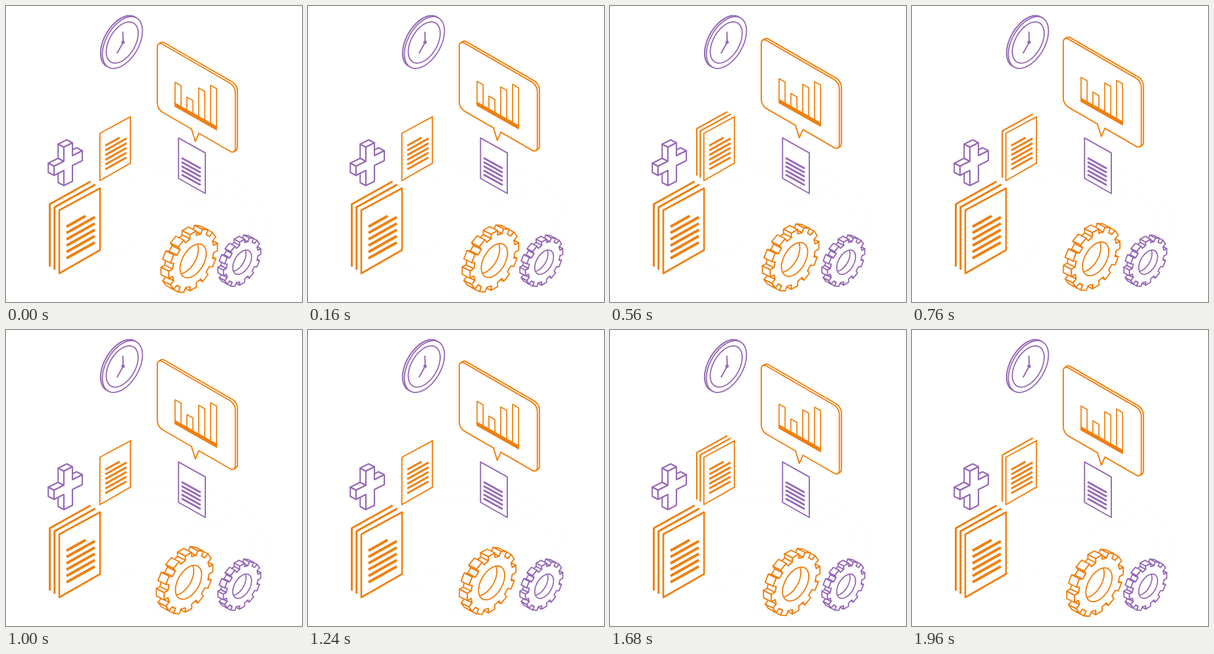
An HTML page with a canvas that plays this animation: 450 by 450 pixels, repeating every 2000 ms.

```html
<!DOCTYPE html>
<html lang="en">
<head>
<meta charset="utf-8">
<title>Isometric report icons</title>
<style>
html, body { margin: 0; width: 100%; height: 100%; overflow: hidden; background: #fff; }
canvas { display: block; width: 450px; height: 450px; }
</style>
</head>
<body>
<canvas id="stage" width="450" height="450"></canvas>
<script>
const ctx = document.getElementById('stage').getContext('2d');
const ORANGE = '#ef7f0f', PURPLE = '#9568b6', WHITE = '#fff', PALE = '#fcfcfc';
const COS = 0.866, SLOPE = 0.577;

function paint(color, width, fill) {
  if (fill) { ctx.fillStyle = fill; ctx.fill(); }
  ctx.strokeStyle = color;
  ctx.lineWidth = width;
  ctx.stroke();
}

function trace(points, closed) {
  ctx.beginPath();
  points.forEach(p => ctx.lineTo(p[0], p[1]));
  if (closed) ctx.closePath();
}

function line(color, width, ...points) {
  trace(points);
  paint(color, width);
}

function shape(points, color, width, fill = WHITE) {
  trace(points, true);
  paint(color, width, fill);
}

// Point at angle a on a circle standing in the plane that rises to the right
const iso = (x, y, r, a) =>
  [x + COS * r * Math.cos(a), y + r * (Math.sin(a) - Math.cos(a) / 2)];

function disc(x, y, r) {
  trace(Array.from({ length: 90 }, (_, i) => iso(x, y, r, i * Math.PI / 45)), true);
}

// Solid with a clockwise front outline and its depth along (dx, dy)
function extrude(points, dx, dy, color, width) {
  const sides = points.map((p, i) => [p, points[(i + 1) % points.length]])
    .filter(([p, q]) => (q[1] - p[1]) * dx - (q[0] - p[0]) * dy > 0);
  const depth = ([p, q]) => (p[0] + q[0]) * dx + (p[1] + q[1]) * dy;
  sides.sort((a, b) => depth(a) - depth(b));
  for (const [p, q] of sides) {
    shape([p, q, [q[0] + dx, q[1] + dy], [p[0] + dx, p[1] + dy]], color, width);
  }
  shape(points, color, width);
}

function gear(x, y, outer, inner, hole, dx, dy, color, width) {
  const teeth = 12, step = 2 * Math.PI / teeth, rim = [];
  for (let i = 0; i < teeth; i++) {
    for (const [r, k] of [[inner, -0.29], [outer, -0.25], [outer, 0.25], [inner, 0.29]]) {
      rim.push(iso(x, y, r, (i + k) * step));
    }
  }
  extrude(rim, dx, dy, color, width);
  ctx.save();
  disc(x, y, hole);
  ctx.clip();
  disc(x + dx, y + dy, hole);
  paint(color, width);
  ctx.restore();
  disc(x, y, hole);
  paint(color, width);
}

// Barely visible curved arrows behind everything
function arrows() {
  for (const inset of [0, 21]) {
    ctx.beginPath();
    ctx.ellipse(236, 335, 160 - inset, 99 - inset, 0, -2, 1.7);
    paint(PALE, 1);
  }
  shape([[269, 306], [296, 287], [330, 289]], PALE, 1);
  shape([[137, 393], [198, 361], [168, 396]], PALE, 1);
}

function clock() {
  disc(174.3, 54, 35.2);
  paint(PURPLE, 2, WHITE);
  disc(177, 55.5, 35.2);
  paint(PURPLE, 1.8, WHITE);
  disc(176.7, 55.5, 28);
  paint(PURPLE, 1.8);
  line(PURPLE, 1.9, [177.6, 39], [178.2, 55], [168.8, 72]);
  ctx.beginPath();
  ctx.arc(178, 55, 2.6, 0, 7);
  ctx.fillStyle = PURPLE;
  ctx.fill();
}

function plus() {
  extrude([[88, 214.5], [101, 208], [101, 227.5], [116, 220], [116, 235], [101, 242.5],
    [101, 266.5], [88, 273], [88, 250], [73, 257.5], [73, 243.5], [88, 236]],
    -8.7, -4.5, PURPLE, 2.1);
}

// Pile of pages; the front page's top left corner is at (x, y)
function pages(x, y, scale, count) {
  ctx.save();
  ctx.translate(x, y);
  ctx.scale(scale, scale);
  for (let i = count - 1; i > 0; i--) {
    const ox = -7.2 * i, oy = -4.6 * i;
    line(ORANGE, 3, [ox, oy + 95], [ox, oy], [ox + 62, oy - 34.5]);
  }
  shape([[0, 0], [62, -33.5], [62, 60.5], [0, 96]], ORANGE, 2.6);
  for (let i = 0; i < 6; i++) {
    const w = i ? 43 : 29, top = 25 + 9.6 * i;
    line(ORANGE, 4, [11, top], [11 + w, top - 0.56 * w]);
  }
  ctx.restore();
}

function purplePage() {
  shape([[262.3, 200.7], [303, 223.3], [303, 285], [262.3, 262]], PURPLE, 1.9);
  for (let i = 0; i < 5; i++) {
    line(PURPLE, 2.8, [267, 231 + 6.3 * i], [296, 247 + 6.3 * i]);
  }
}

function panel(x, y) {
  ctx.save();
  ctx.transform(COS, 0.5, 0, 1, x, y);
  ctx.beginPath();
  ctx.roundRect(0, 0, 137, 103.5, 9);
  ctx.restore();
  paint(ORANGE, 1.9, WHITE);
}

function bubble(dy) {
  ctx.save();
  ctx.translate(0, dy);
  panel(233.2, 51.5);
  panel(230, 53.5);
  line(ORANGE, 1.9, [232.3, 57.4], [235.5, 55.4]);
  line(ORANGE, 1.9, [346.4, 221.6], [349.6, 219.6]);

  line(WHITE, 4, [283, 187.6], [292.4, 193]);
  trace([[282, 187], [287.8, 206], [293.3, 193.5]]);
  paint(ORANGE, 1.9, WHITE);

  [116, 138.5, 124.5, 120.5].forEach((top, i) => {
    const x = 257 + 18 * i, base = 148.5 + 18 * i * SLOPE;
    shape([[x, top], [x + 9.2, top + 5.3], [x + 9.2, base + 5.3], [x, base]], ORANGE, 1.7);
  });
  trace([[256.2, 146.5], [320.8, 183], [320.8, 189.5], [256.2, 153]], true);
  ctx.fillStyle = ORANGE;
  ctx.fill();
  ctx.restore();
}

function draw(now) {
  const t = Math.floor(now % 2000 / 40) * 40;
  const shift = 1 - Math.abs(t / 1000 - 1);
  const count = [1, 2, 3, 2][Math.floor(t % 1000 / 250)];

  ctx.fillStyle = WHITE;
  ctx.fillRect(0, 0, 450, 450);
  ctx.lineJoin = 'round';
  arrows();
  clock();
  plus();
  pages(142.7, 193.5, 0.75, count);
  pages(81, 310.5, 1, 3);
  purplePage();
  bubble(-10 * shift);
  gear(359, 389.5, 33, 28, 16.5, -8.5, -4.5, PURPLE, 1.8);
  gear(284.5 - 7 * shift, 387.5 - 4 * shift, 43, 36.5, 23, -12, -6, ORANGE, 1.9);
}

const start = performance.now();
function tick() {
  draw(performance.now() - start);
  requestAnimationFrame(tick);
}
tick();
</script>
</body>
</html>
```
